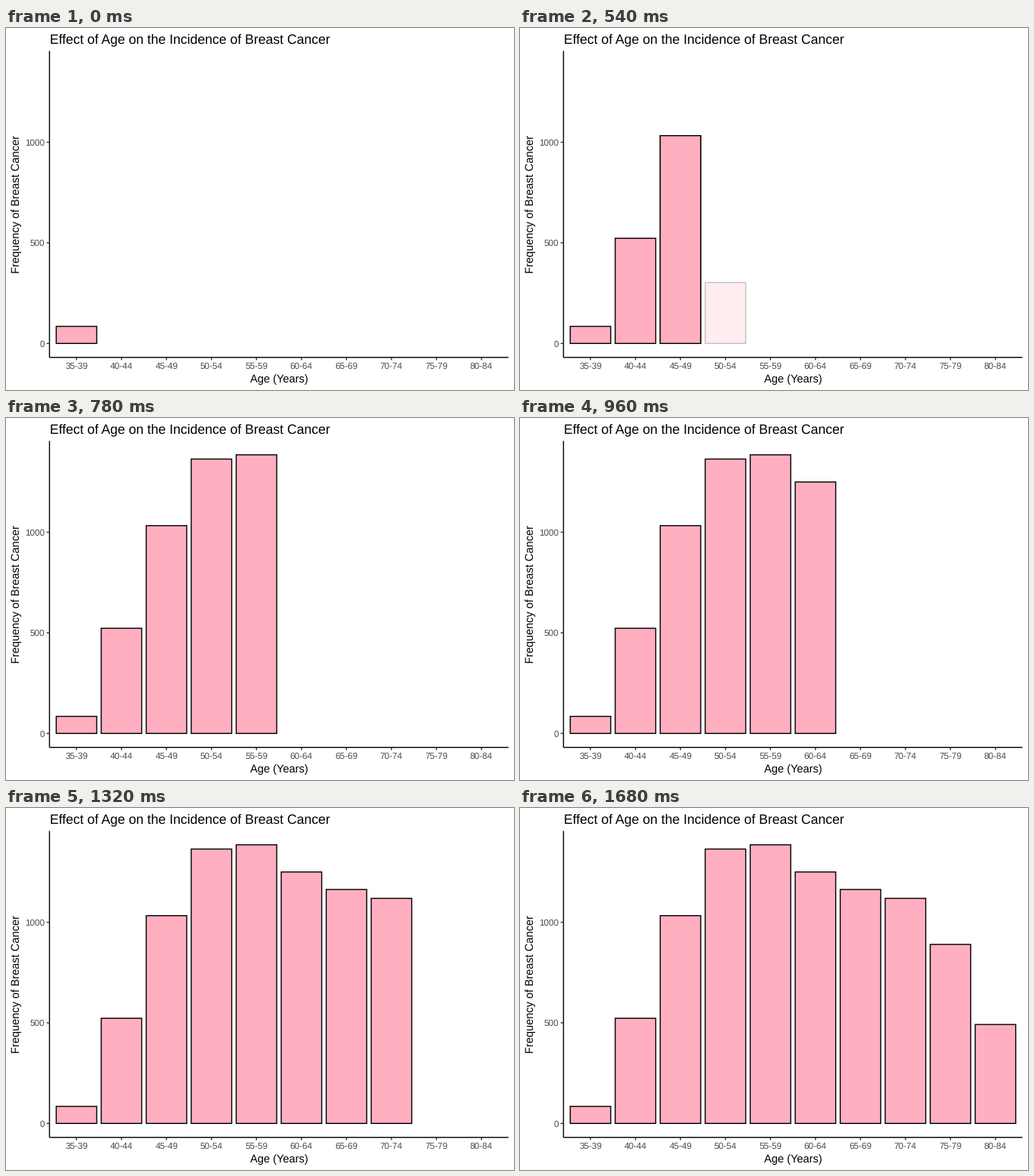
Recreate the animation shown at these times as a matplotlib script. Size 672x480 px, loop 1.8 s.

```python
import matplotlib.pyplot as plt
from matplotlib.animation import FuncAnimation
from matplotlib.patches import Rectangle

plt.rcParams["font.family"] = "Liberation Sans"
plt.rcParams["text.hinting"] = "none"
plt.rcParams["toolbar"] = "None"

WIDTH, HEIGHT, DPI = 672, 480, 96
FRAMES, INTERVAL = 60, 30
ENTER_STEPS = 3

LEFT, RIGHT, TOP, BOTTOM = 57.5, 664.67, 30.35, 436.75
COUNTS = [85, 523, 1033, 1364, 1385, 1250, 1163, 1119, 890, 492]
UNIT_X = (RIGHT - LEFT) / (len(COUNTS) + 0.2)
UNIT_Y = (BOTTOM - TOP) / (1.1 * max(COUNTS))
BASE = BOTTOM - 0.05 * max(COUNTS) * UNIT_Y
BAR_WIDTH = 0.9 * UNIT_X
LINE = 1.42 * 72 / DPI
TICK = 3.67
PINK = "#FFAFC0"

fig = plt.figure(figsize=(WIDTH / DPI, HEIGHT / DPI), dpi=DPI, facecolor="white")
ax = fig.add_axes([0, 0, 1, 1])
ax.set_xlim(0, WIDTH)
ax.set_ylim(HEIGHT, 0)
ax.axis("off")


def center(i):
    return LEFT + (0.6 + i) * UNIT_X


def line(xs, ys, color="black"):
    ax.plot(xs, ys, color=color, lw=LINE, solid_capstyle="butt", snap=False)


def label(x, y, text, size, color="black", ha="center", **kwargs):
    ax.text(x, y, text, size=size, color=color, ha=ha, va="baseline", **kwargs)


def make_bar(i):
    bar = Rectangle((center(i) - BAR_WIDTH / 2, BASE), BAR_WIDTH, 0,
                    facecolor=PINK, edgecolor="black", lw=LINE,
                    joinstyle="miter", snap=False)
    return ax.add_patch(bar)


def draw_axes():
    line([LEFT, LEFT], [TOP, BOTTOM])
    line([LEFT, RIGHT], [BOTTOM, BOTTOM])
    for value in (0, 500, 1000):
        y = BASE - value * UNIT_Y
        line([LEFT - TICK, LEFT], [y, y], "#333333")
        label(LEFT - TICK - 2.93, y + 4.3, str(value), 8.8, "#4D4D4D", "right")
    for i in range(len(COUNTS)):
        x, age = center(i), 35 + 5 * i
        line([x, x], [BOTTOM, BOTTOM + TICK], "#333333")
        label(x, 452, f"{age}-{age + 4}", 8.8, "#4D4D4D")
    label(LEFT, 20, "Effect of Age on the Incidence of Breast Cancer", 13.2, ha="left")
    label((LEFT + RIGHT) / 2, 470, "Age (Years)", 11)
    ax.text(18, (TOP + BOTTOM) / 2, "Frequency of Breast Cancer", size=11,
            rotation=90, ha="right", va="center", rotation_mode="default").set(
        rotation_mode="anchor", ha="center", va="baseline")


def start_frame(i):
    """First frame of a bar's entrance; the first two pauses are one frame longer."""
    return 6 * i - 2 + min(i - 1, 2)


def ease(t):
    return 2 * t * t if t < 0.5 else 1 - 2 * (1 - t) ** 2


def progress(i, frame):
    if i == 0:
        return 1.0
    t = (frame - start_frame(i) + 1) / ENTER_STEPS
    return ease(min(max(t, 0), 1))


draw_axes()
bars = [make_bar(i) for i in range(len(COUNTS))]
# The leaving bar is drawn over its own shadow, which thickens its outline.
overlays = [make_bar(i) for i in range(len(COUNTS) - 1)]


def update(frame):
    levels = [progress(i, frame) for i in range(len(COUNTS))]
    for bar, count, level in zip(bars, COUNTS, levels):
        bar.set_height(-count * UNIT_Y * level)
        bar.set_alpha(level)
        bar.set_visible(level > 0)
    for overlay, count, following in zip(overlays, COUNTS, levels[1:]):
        overlay.set_height(-count * UNIT_Y)
        overlay.set_visible(0 < following < 1)
    return bars + overlays


anim = FuncAnimation(fig, update, frames=FRAMES, interval=INTERVAL,
                     repeat=True, repeat_delay=0, blit=False)
plt.show()
```
